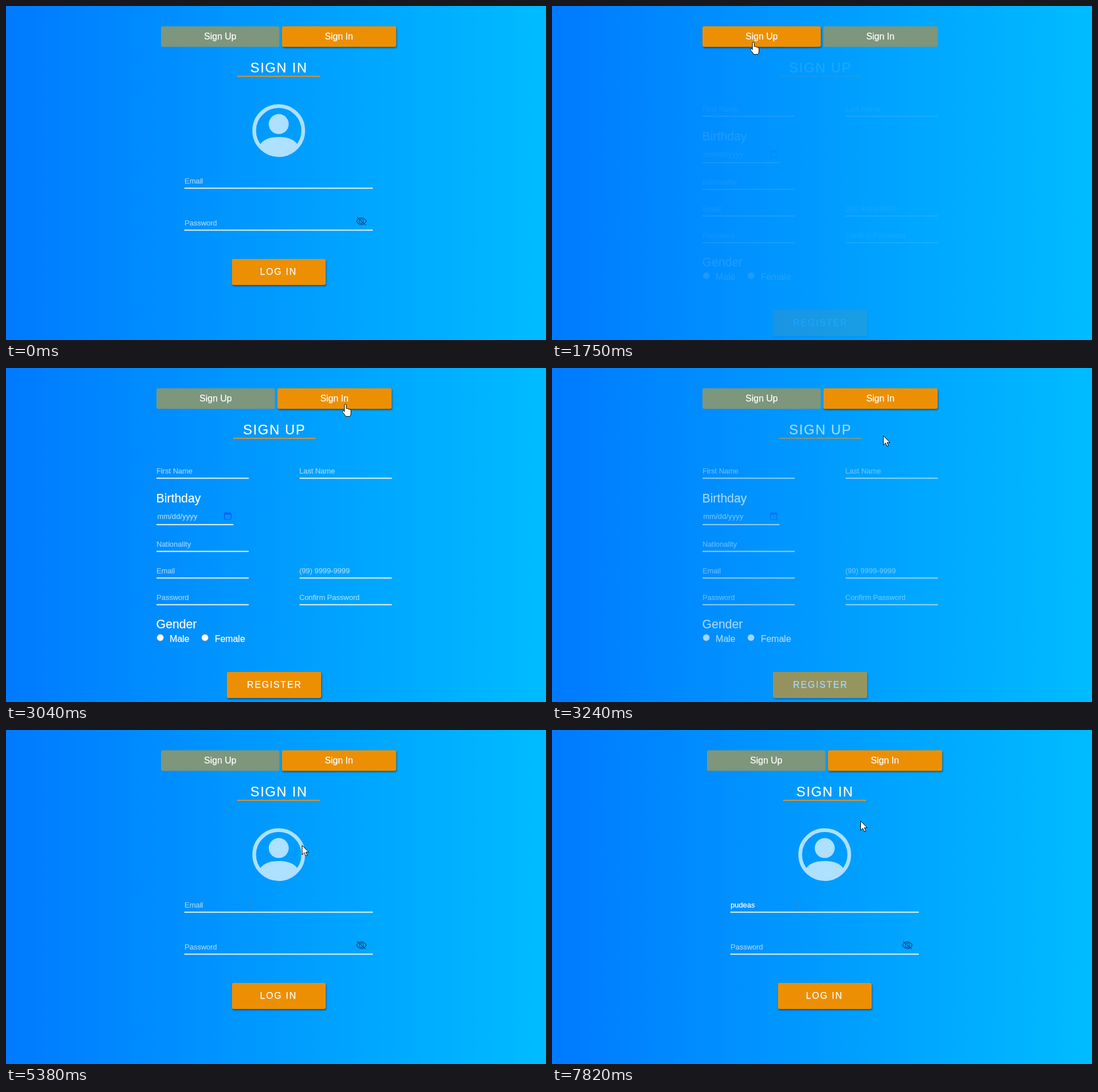
An HTML page that plays this animation: 951 by 589 pixels, repeating every 8 s.

```html
<!DOCTYPE html>
<html lang="en">
<head>
<meta charset="utf-8">
<title>Sign in form</title>
<style>
  html, body { margin: 0; width: 100%; height: 100%; overflow: hidden; }
  body { background: linear-gradient(to right, #007aff, #00bcff); }
  svg { display: block; width: 951px; height: 589px; font: 13px "Liberation Sans", Arial, sans-serif; fill: #fff; }
  text { stroke: #fff; stroke-width: .25px; }
  .raised { fill: #ed8f03; filter: drop-shadow(1px 2px 1.5px rgba(0, 0, 0, .45)); }
  .tab { fill: #7d967c; }
  .tab.raised { fill: #ed8f03; }
  .label { font-size: 16px; }
  .center { text-anchor: middle; }
  .title { font-size: 24px; letter-spacing: 1.65px; }
  .section { font-size: 21.4px; }
  .caps { font-size: 16px; letter-spacing: 1.85px; }
  .hint { opacity: .6; }
  .rule { fill: #e6f5ff; }
  .accent { fill: #cf943a; }
  .icon { fill: none; stroke-width: 1.3; }
  .pointer { fill: #fff; stroke: #000; stroke-linejoin: round; }
</style>
</head>
<body>
<svg viewBox="0 0 951 589">
  <g id="tabs">
    <rect id="tabUp" class="tab" x="273" y="35.7" width="208.5" height="36.3" rx="3"/>
    <rect id="tabIn" class="tab" x="486" y="35.7" width="201.2" height="36.3" rx="3"/>
    <text class="label center" x="377.3" y="58.5">Sign Up</text>
    <text class="label center" x="586.3" y="58.5">Sign In</text>
  </g>

  <g id="signIn">
    <text class="title" x="430.3" y="117">SIGN IN</text>
    <rect class="accent" x="407" y="123" width="146" height="2"/>
    <g fill="#aee0ff">
      <circle cx="480.3" cy="219.7" r="43.2" fill="none" stroke="#aee0ff" stroke-width="6.5"/>
      <circle cx="480.3" cy="208.2" r="17.6"/>
      <path d="M446 246C454 234 466 231 480.3 231S507 234 514.6 246A43 43 0 0 1 446 246"/>
    </g>
    <text id="emailHint" class="hint" x="314.5" y="313">Email</text>
    <text id="typed" x="314.5" y="313"></text>
    <rect id="caret" y="301" width="1" height="15"/>
    <rect class="rule" x="314" y="320.3" width="332" height="2"/>
    <text class="hint" x="314.5" y="387">Password</text>
    <rect class="rule" x="314" y="394.3" width="332" height="2"/>
    <g class="icon" stroke="#0b5591">
      <path d="M617 379.5Q626 367.5 634.7 379.5Q626 391.5 617 379.5M618.5 372.5L633.5 386.5"/>
      <circle cx="625.8" cy="379.5" r="3.7"/>
    </g>
    <rect class="raised" x="398" y="446" width="165" height="46" rx="3"/>
    <text class="caps" x="447.2" y="474">LOG IN</text>
  </g>

  <g id="signUp">
    <text class="title" x="417.6" y="117">SIGN UP</text>
    <rect class="accent" x="400" y="123" width="145" height="2"/>
    <g id="fields"></g>
    <text class="section" x="264.6" y="236.5">Birthday</text>
    <g class="icon" stroke="#0558ee">
      <rect x="384.7" y="256" width="11.6" height="11.3" rx="1"/>
      <path d="M384.5 257.3h12M387.3 254v2M393.7 254v2" stroke-width="1.8"/>
    </g>
    <text class="section" x="264.6" y="459">Gender</text>
    <g stroke="#7d8fa0" stroke-width=".8">
      <circle cx="271.7" cy="475.5" r="6"/>
      <circle cx="350.4" cy="475.5" r="6"/>
    </g>
    <text class="label" x="288.3" y="483">Male</text>
    <text class="label" x="367.7" y="483">Female</text>
    <rect class="raised" x="389" y="536" width="166" height="46" rx="3"/>
    <text class="caps" x="424.5" y="564">REGISTER</text>
  </g>

  <path id="trace" d="M351.5 62h4v4l2 2v4h-5z" fill="#4d7f8a"/>
  <path id="beamTrace" class="icon" transform="translate(431 311)" d="M-3-7.5h2l1 1 1-1h2M0-6.5v13M-3 7.5h2l1-1 1 1h2" stroke="#1e90da" stroke-width="1"/>
  <g id="cursor">
    <path id="arrow" class="pointer" d="M.5 .5V17L4.4 13.3 7 19.2 9.6 18.1 7.1 12.3H12.2Z"/>
    <path id="hand" class="pointer" transform="translate(-6 0)" d="M5 13V2.5a1.7 1.7 0 0 1 3.4 0V8.5q2-.8 3 .8 2-.6 2.8 .8 2.3-.4 2.3 2V17q0 3-2 5.5H7.5Q5.5 19 2 15.2 .5 13.2 2 12.4 3.5 12 5 14Z"/>
    <path id="beam" class="icon" d="M-3-7.5h2l1 1 1-1h2M0-6.5v13M-3 7.5h2l1-1 1 1h2" stroke="#1e90da" stroke-width="1"/>
  </g>
</svg>
<script>
const LOOP = 8000;
const $ = id => document.getElementById(id);
const show = (id, on) => { $(id).style.display = on ? '' : 'none'; };

const field = (text, x, y) =>
  `<text class="hint" x="${x}" y="${y}">${text}</text>
   <rect class="rule" x="${x > 400 ? 517 : 265}" y="${y + 7.4}" width="162.5" height="2"/>`;
$('fields').innerHTML = [
  field('First Name', 265, 186),
  field('Last Name', 516.5, 186),
  field('Nationality', 265, 315),
  field('Email', 265, 362),
  field('(99) 9999-9999', 516.5, 362),
  field('Password', 265, 409),
  field('Confirm Password', 516.5, 409),
  '<text x="266.3" y="266" opacity=".67" letter-spacing=".15">mm/dd/yyyy</text>',
  '<rect class="rule" x="265" y="275.2" width="135.5" height="2"/>'
].join('');

// Screen updates come in bursts: first update, last update, count.
const bursts = [[450, 1020, 9], [1620, 2370, 12], [2770, 3530, 11],
  [3600, 3930, 6], [4200, 4270, 2], [4470, 5240, 12], [5310, 5730, 7]];

function lastUpdate(t) {
  let shown = 0;
  for (const [start, end, count] of bursts) {
    if (t < start) break;
    const step = (end - start) / (count - 1);
    shown = Math.min(end, start + Math.floor((t - start) / step + .15) * step);
  }
  return shown;
}

// Pointer hot spot: time, x, y.
const route = [[450, 732, 437], [1020, 354, 63], [1820, 354, 63], [2095, 545, 58],
  [2370, 578, 58], [2770, 578, 58], [2980, 597, 62], [3150, 595, 85], [3225, 583, 119],
  [3930, 396, 292], [4200, 396, 293], [4470, 396, 293], [4750, 431, 311], [4950, 431, 311],
  [5240, 525, 224], [5380, 521, 203], [5730, 543, 160]];

const swing = k => .5 - Math.cos(Math.PI * Math.min(1, Math.max(0, k))) / 2;
const fade = (t, start, end) => swing((t - start) / (end - start));

function pointerAt(t) {
  const next = route.findIndex(p => p[0] > t);
  if (next < 0) return route[route.length - 1].slice(1);
  const [t0, x0, y0] = route[Math.max(0, next - 1)];
  const [t1, x1, y1] = route[next];
  const k = t1 > t0 ? fade(t, t0, t1) : 0;
  return [x0 + (x1 - x0) * k, y0 + (y1 - y0) * k];
}

const word = 'pudeas';
const keyTimes = [6550, 6620, 6820, 6950, 7090, 7290];
const caretSpans = [[4780, 5310], [5930, 6480], [6550, 7820]];

function drawTyping(t) {
  const count = keyTimes.filter(k => k <= t).length;
  $('typed').textContent = word.slice(0, count);
  show('emailHint', !count);
  show('caret', caretSpans.some(([a, b]) => t >= a && t < b));
  $('caret').setAttribute('x', Math.floor(314 + 7.2 * count));
}

function drawCursor(t, signUpShown) {
  const [x, y] = pointerAt(t);
  const overTab = y < 72 && x > 265 && x < 687;
  const overInput = !signUpShown && x > 314 && x < 646 && y > 300 && y < 322;
  $('cursor').setAttribute('transform', `translate(${Math.round(x)} ${Math.round(y)})`);
  show('cursor', t >= 450);
  show('hand', overTab);
  show('beam', overInput);
  show('arrow', !overTab && !overInput);
  show('trace', t > 1900 && t < 2770);
  show('beamTrace', t >= 4750);
}

function draw(now) {
  const t = now % LOOP;
  const shown = lastUpdate(t);
  const signUpShown = shown >= 1620 && shown < 3560;
  const signUpActive = shown >= 1620 && shown < 2980;

  $('tabs').setAttribute('transform', `translate(${signUpShown ? -8 : 0} 0)`);
  $('tabUp').classList.toggle('raised', signUpActive);
  $('tabIn').classList.toggle('raised', !signUpActive);
  show('signUp', signUpShown);
  show('signIn', !signUpShown);
  $('signUp').style.opacity = fade(shown, 1672, 2070) - fade(shown, 3035, 3500);
  $('signIn').style.opacity = shown < 1620 ? 1 : fade(shown, 3560, 3930);

  drawTyping(t);
  drawCursor(shown, signUpShown);
}

const begin = performance.now();
function tick() {
  draw(performance.now() - begin);
  requestAnimationFrame(tick);
}
tick();
</script>
</body>
</html>
```
